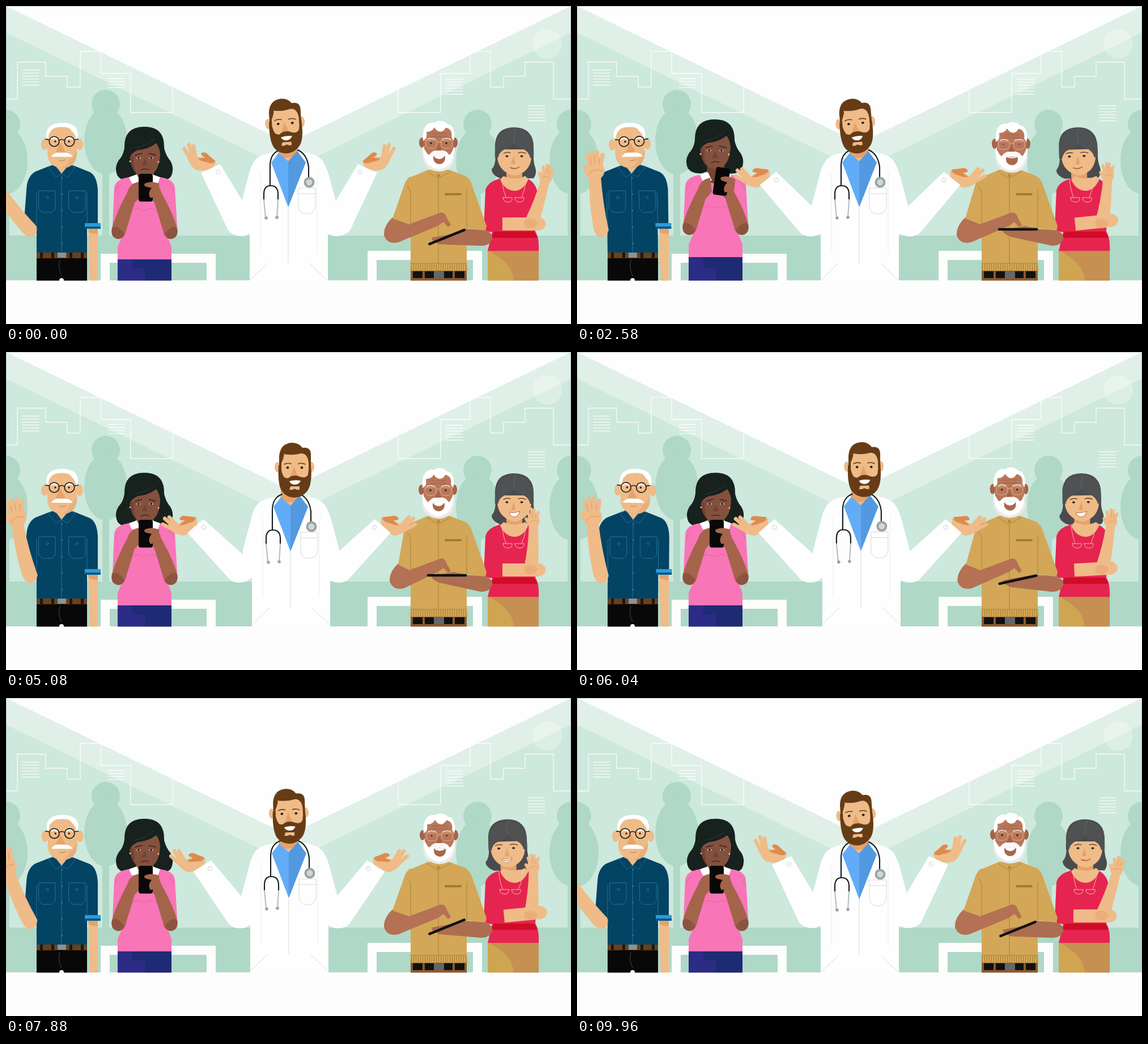
An HTML page for the animation above (10000 ms loop, 997 px wide and 561 px high).

```html
<!DOCTYPE html>
<html lang="en">
<head>
<meta charset="utf-8">
<title>Doctor and patients</title>
<style>
html, body { margin: 0; width: 100%; height: 100%; overflow: hidden; background: #fdfdfd; }
svg { display: block; width: 100vw; height: 100vh; }
.line { fill: none; stroke-linecap: round; stroke-linejoin: round; }
.skin { fill: #efbb88; }
.shade { fill: #e5a269; }
.dark { fill: #a4644a; }
</style>
</head>
<body>
<svg viewBox="0 0 997 561">
  <!-- scenery -->
  <path fill="#cde8dc" d="M0 0H997V484H0Z"/>
  <path fill="#e0f0e9" d="M0 0V47L498 290 997 47V0Z"/>
  <path fill="#fefefe" d="M0 0L498 242 997 0Z"/>
  <g fill="#afd8c7">
    <path d="M0 405H997V484H0Z"/>
    <g id="trees"></g>
  </g>
  <g fill="#fff" opacity=".3"><circle cx="955" cy="67" r="26"/><circle cx="954" cy="65" r="9" opacity=".6"/></g>
  <g class="line" stroke="#fff" stroke-width="1.3" opacity=".85">
    <path d="M0 164H20V99H70V124H108V143H131V80H167V119H220V188H294V143"/>
    <path d="M997 164H966V99H916V124H878V143H855V80H819V119H767V188H692V149"/>
    <path id="windows"/>
  </g>
  <path class="line" stroke="#b9c6c0" d="M.5 484V.5H996.5V484"/>
  <path class="line" style="stroke-linecap:butt;stroke-linejoin:miter" stroke="#fdfdfd" stroke-width="16" d="M175 484V445H362V484M646 484V440H832V484"/>

  <!-- woman in red -->
  <g id="redHead">
    <path fill="#4a4b4d" d="M863 252Q861 214 897 214Q933 215 931 254Q930 272 933 282Q938 294 931 304H872Q857 298 857 288Q866 280 863 252Z"/>
    <path class="shade" d="M883 288H911V312H883Z"/>
    <path class="skin" d="M867 253H927V268Q925 287 910 295Q897 303 885 295Q869 286 867 268Z"/>
    <path fill="#505153" d="M863 268Q860 217 897 216Q934 218 931 268L925 268Q922 255 909 251Q900 249 897 241Q893 250 883 252Q871 255 868 268Z"/>
    <path class="line" stroke="#6a6b6d" stroke-width=".8" d="M897 241Q895 225 900 216"/>
    <path class="shade" d="M896 264L891 279H899Z"/>
    <g id="redFace">
      <path class="line" stroke="#4a3a32" stroke-width="1.3" d="M878 260Q884 257 890 259M904 259Q911 257 917 260"/>
      <g fill="#30251f"><ellipse cx="884" cy="265" rx="2.6" ry="1.8"/><ellipse cx="910" cy="265" rx="2.6" ry="1.8"/></g>
      <path class="line" stroke="#a8533c" stroke-width="1.4" d="M890 285Q898 289 906 284"/>
      <path id="redSmile" fill="#fff" stroke="#a8533c" stroke-width=".8" d="M888 283Q897 285 907 281Q904 291 896 291Q890 290 888 283Z"/>
    </g>
  </g>
  <path fill="#cfa552" d="M850 430H940V490H850Z"/>
  <path fill="#c69052" d="M850 431H940V490H896Q898 455 850 431Z"/>
  <path fill="#e62450" d="M876 303Q850 309 846 325L843 392Q845 398 858 399L850 432H940Q941 408 934 398L938 330Q935 310 917 303Q897 325 876 303Z"/>
  <path class="skin" d="M878 300Q897 309 916 300L922 305Q913 326 897 326Q880 325 872 306Z"/>
  <path id="pendant" class="line" stroke="#f1c9ba" stroke-width=".9" d="M875 305Q877 325 882 337M918 305Q916 325 910 337M877 338H893Q894 346 885 346Q877 345 877 338ZM898 338H914Q915 346 906 346Q898 345 898 338"/>
  <path fill="#d00c27" d="M862 398H932L938 409H854Z"/>
  <path id="redFore" class="skin" d="M876 373H944Q954 379 952 387Q949 396 938 396H876Z"/>
  <g id="redArm">
    <path class="skin" d="M914 382Q923 340 924 306H940Q941 350 939 384Q928 398 914 382Z"/>
    <ellipse class="skin" cx="932" cy="298" rx="11" ry="13"/>
    <path class="line" stroke="#efbb88" stroke-width="5" d="M927 296L923 282M930 292L929 277M934 292V278M938 295L941 283M924 303L919 294"/>
    <path class="line" stroke="#d9945e" stroke-width=".8" d="M926 300Q932 295 939 298M931 291V281M936 292L937 284"/>
  </g>
  <path class="shade" d="M915 378Q930 371 938 382Q935 394 921 392Q912 388 915 378Z" opacity=".5"/>

  <!-- man in mustard -->
  <path fill="#8b5a2d" d="M714 462H813V490H714Z"/>
  <path fill="#111" d="M718 468H735V480H718ZM739 468H755V480H739ZM773 468H788V480H773ZM792 468H809V480H792Z"/>
  <path fill="#62676b" d="M755 468H773V480H755Z"/>
  <path fill="#d3a757" d="M745 289H782L811 300Q820 306 823 318L848 388 846 397 813 392V453L815 467H713L714 453V302Z"/>
  <path class="line" stroke="#a77d35" stroke-width=".9" d="M763 304V453M813 392V325M743 292L762 304 784 292M714 454H813"/>
  <path class="line" stroke="#a77d35" stroke-width="13" stroke-dasharray="1 3" style="stroke-linecap:butt" d="M715 461H813"/>
  <path class="line" stroke="#a17a36" stroke-width="4" d="M776 332H802"/>
  <circle cx="763" cy="299" r="2" fill="none" stroke="#8a652a"/>
  <path id="lowerArm" fill="#ad6d50"/>
  <path id="upperArm" fill="#b47154"/>
  <path id="sleeve" fill="#d3a757"/>
  <path class="line" stroke="#a77d35" stroke-width=".9" d="M714 385V330Q713 322 708 318"/>
  <path id="tablet" class="line" stroke="#111" stroke-width="4.5" d="M-33 0H33"/>
  <g id="tanHead">
    <path fill="#e9ebec" d="M735 240H792V268Q788 291 764 292Q739 290 735 268Z"/>
    <g class="dark"><ellipse cx="734" cy="241" rx="5" ry="9"/><ellipse cx="792" cy="241" rx="5" ry="9"/></g>
    <path fill="#b9775a" d="M738 226Q740 208 764 208Q788 208 790 226V262H738Z"/>
    <path class="line" stroke="#96593f" stroke-width=".8" d="M751 225H777M750 230H778"/>
    <path fill="#fff" d="M736 238Q734 217 742 210Q748 204 756 206Q762 201 769 203Q776 204 779 209Q786 208 789 217Q793 224 790 238L786 232Q788 222 782 217Q777 214 776 215Q770 225 761 220Q757 217 756 214Q752 222 742 222Q743 230 741 234Z"/>
    <path fill="#fff" d="M736 248Q741 258 746 264Q751 254 764 254Q779 254 782 264Q788 258 790 248Q793 282 764 288Q735 284 736 248Z"/>
    <path fill="#a9664b" d="M754 265Q764 262 775 265Q776 278 765 279Q753 278 754 265Z"/>
    <path id="tanMouth" fill="#fff" d="M755 265Q765 262 774 265Q770 270 764 270Q757 269 755 265Z"/>
    <path fill="#a4644a" d="M764 242L758 255H769Z"/>
    <path fill="#f8f8f8" d="M748 262Q754 253 764 257Q775 253 781 262Q770 266 764 263Q757 266 748 262Z"/>
    <path class="line" stroke="#f3eeea" stroke-width="1.7" d="M744 235Q749 232 757 235M770 235Q778 232 784 235"/>
    <g id="tanEyes" fill="#2b1b15"><circle cx="750" cy="242" r="1.7"/><circle cx="777" cy="242" r="1.7"/></g>
    <path class="line" stroke="#dfb599" stroke-width=".9" d="M741 237H760V246Q758 251 752 251H746Q741 250 741 245ZM768 237H787V245Q786 251 780 251H774Q768 250 768 245ZM760 240H768"/>
  </g>

  <!-- woman in pink -->
  <path class="pinkHead" fill="#17211e" d="M209 250Q208 213 244 213Q280 213 279 250Q282 264 290 273Q298 287 291 301Q283 311 266 308L245 300 222 308Q205 310 197 300Q190 286 199 272Q207 264 209 250Z"/>
  <path fill="#2c2b86" d="M197 440H292V490H197Z"/>
  <path fill="#1f2a74" d="M223 440H292V490H245V463H223Z"/>
  <g id="pinkBody">
    <path fill="#f875b8" d="M217 302Q194 305 191 320L188 390 213 388 197 425V447H292V425L278 388 302 390 298 320Q296 305 272 302Z"/>
    <path fill="#74442f" d="M230 285H260L262 312Q245 322 228 312Z"/>
    <path fill="#fff" d="M217 302L231 297 238 312 222 313ZM272 302L258 297 252 312 268 313Z"/>
    <path class="line" stroke="#e05ca0" stroke-width=".8" d="M216 365Q230 352 243 361Q258 352 272 365M193 330Q195 318 203 314M296 330Q294 318 286 314"/>
  </g>
  <g class="pinkHead">
    <path fill="#85513f" d="M218 256Q220 236 245 236Q271 236 272 258Q272 282 262 293Q245 308 228 293Q218 280 218 256Z"/>
    <path fill="#714333" d="M245 270L239 281H250ZM220 264Q218 284 230 295Q224 280 226 265Z"/>
    <path fill="#17211e" d="M212 268Q210 225 245 223Q279 226 276 268L272 260Q270 248 265 242Q252 252 234 254Q222 257 217 270Z"/>
    <path class="line" stroke="#2f3c37" d="M226 251Q250 246 262 234"/>
    <path class="line" stroke="#3a2019" stroke-width="1.3" d="M228 263L240 260M252 260L264 263"/>
    <g fill="#cbb8ae"><ellipse cx="234" cy="268" rx="4" ry="1.5"/><ellipse cx="256" cy="268" rx="4" ry="1.5"/></g>
    <g fill="#1b1210"><circle cx="234" cy="268" r="1.8"/><circle cx="256" cy="268" r="1.8"/></g>
    <path class="line" stroke="#5a2d24" stroke-width="1.8" d="M238 289Q245 286 252 289"/>
    <g fill="#e9c77b"><circle cx="219" cy="274" r="1.5"/><circle cx="269" cy="275" r="1.5"/></g>
  </g>
  <g id="pinkArms" class="dark">
    <path d="M187 392Q194 366 214 329Q218 313 235 310L238 334Q233 342 227 347L212 396Q209 411 198 411Q184 409 187 392Z"/>
    <path d="M302 392Q295 366 274 329Q270 313 256 310L252 334Q257 342 262 347L277 396Q280 411 291 411Q305 409 302 392Z"/>
    <path fill="#8d5340" d="M187 392Q195 384 209 402Q205 411 198 411Q184 409 187 392ZM302 392Q294 384 280 402Q284 411 291 411Q305 409 302 392Z"/>
  </g>
  <g id="phone">
    <rect x="234" y="296" width="25" height="49" rx="4" fill="#080808"/>
    <path class="dark" d="M270 313Q256 308 245 313Q242 317 248 319L257 321Q249 331 255 339L271 333Z"/>
  </g>

  <!-- man in navy -->
  <path class="skin" d="M145 388H162V490H148Z"/>
  <path class="shade" d="M145 391H162V403L146 400Z"/>
  <path fill="#080808" d="M54 440H143V490H54Z"/>
  <path class="line" stroke="#555" stroke-width=".8" d="M95 448Q91 462 98 476"/>
  <circle cx="98" cy="484" r="4" fill="#fdfdfd"/>
  <path fill="#6b4019" d="M54 434H143V445H54Z"/>
  <path fill="#23160d" d="M60 434H65V446H60ZM80 434H85V446H80ZM112 434H117V446H112ZM132 434H137V446H132Z"/>
  <path fill="#8b9297" d="M91 434H106V444H91Z"/>
  <g id="navyBody">
    <path fill="#034364" d="M80 281H118L148 293Q161 300 162 326V384H143V435H54V392H31L36 325Q37 300 52 292Z"/>
    <path fill="#2b9bd6" d="M139 383H167V389H139Z"/><path fill="#08598a" d="M139 389H167V393H139ZM30 386H54V392H30Z"/>
    <path class="skin" d="M86 276H111L112 285 98 297 85 285Z"/>
    <path class="shade" d="M86 276H111V281Q98 291 86 281Z"/>
    <path fill="#034364" stroke="#2e769f" stroke-width=".8" d="M85 279L98 296 88 302 75 285ZM112 279L98 296 109 302 122 285Z"/>
    <path class="line" stroke="#2e769f" stroke-width=".9" d="M98 300V434M58 326H87V358L81 364H64L58 358ZM111 326H140V358L134 364H117L111 358ZM143 384V330M54 384V330"/>
    <g class="line" stroke="#2e769f" stroke-width=".9"><circle cx="73" cy="338" r="2"/><circle cx="125" cy="338" r="2"/></g>
    <path class="line" stroke="#4c93ba" stroke-width="2" stroke-dasharray="0 29" d="M99 303V430"/>
  </g>
  <g id="navyArm">
    <path class="skin" d="M29 390Q23 340 27 300H47Q48 350 56 396Q52 408 42 408Q32 407 29 390Z"/>
    <ellipse class="skin" cx="37" cy="290" rx="17" ry="17"/>
    <path class="line" stroke="#efbb88" stroke-width="7.5" d="M30 285L26 263M35 279L34 258M41 280L43 258M47 284L52 263M24 293L20 283"/>
    <path class="line" stroke="#d9945e" stroke-width=".9" d="M26 297Q34 284 50 291M31 279L30 266M38 277V264M45 279L47 267"/>
  </g>
  <g id="navyHead">
    <ellipse class="skin" cx="68" cy="244" rx="6" ry="10"/><ellipse class="skin" cx="130" cy="244" rx="6" ry="10"/>
    <path class="skin" d="M73 226Q74 214 98 214Q124 214 125 226V262Q123 285 99 286Q75 284 73 262Z"/>
    <path class="shade" d="M112 270Q122 265 125 254V262Q123 285 99 286Q110 280 112 270Z" opacity=".5"/>
    <path fill="#fff" d="M71 232Q69 207 98 206Q128 206 127 229L124 238Q123 226 116 221Q112 212 98 213Q84 213 79 221Q75 224 75 234Z"/>
    <g id="navyFace">
      <path class="shade" d="M95 240L88 258H105Z"/>
      <path class="line" stroke="#fff" stroke-width="2.6" d="M79 235Q84 231 91 235M106 235Q112 231 118 235"/>
      <g fill="#2a1a10"><circle cx="87" cy="239" r="1.7"/><circle cx="111" cy="239" r="1.7"/></g>
      <g fill="none" stroke="#171717" stroke-width="1.6"><circle cx="85" cy="239" r="8.7"/><circle cx="112" cy="239" r="8.7"/><path d="M94 237Q98 234 103 237M76 236L69 235M121 236L128 235"/></g>
      <path fill="#fff" d="M80 266Q84 257 98 259Q113 257 118 266Q98 266 80 266Z"/>
      <path class="line" stroke="#ce8650" stroke-width="1.2" d="M94 272Q99 274 105 271"/>
    </g>
  </g>

  <!-- doctor -->
  <defs>
    <g id="hand">
      <path class="skin" d="M317 263Q321 280 334 290Q350 294 364 287L370 276Q354 266 338 268L327 262Z"/>
      <path class="line" stroke="#efbb88" stroke-width="6.5" d="M324 272L313 254M328 270L321 247M334 272L329 249"/>
      <path fill="#df8a4d" d="M343 261Q349 256 357 264L369 273Q365 280 354 276Q340 274 338 270Q346 269 350 268Q343 265 343 261Z"/>
    </g>
    <path id="foreSleeve" fill="#fefefe" d="M344 294L378 279 436 375Q438 402 419 406Q402 407 392 396Z"/>
  </defs>
  <g id="armL"><use href="#hand" id="handL"/><use href="#foreSleeve"/><circle cx="374" cy="293" r="3.5" fill="none" stroke="#cfcfcf"/></g>
  <g transform="matrix(-1 0 0 1 999 0)"><g id="armR"><use href="#hand" id="handR"/><use href="#foreSleeve"/><circle cx="374" cy="293" r="3.5" fill="none" stroke="#cfcfcf"/></g></g>
  <g id="docBody">
    <path fill="#fefefe" d="M470 259Q446 262 438 274Q431 284 427 303L414 352 412 390Q418 406 430 402V495H568V402Q581 406 586 390L584 352 571 303Q566 284 558 272Q549 262 528 258Z"/>
    <path class="skin" d="M481 240H515V265L498 280 480 265Z"/>
    <path class="shade" d="M481 250H515V261Q498 274 481 263Z"/>
    <path fill="#62acf7" d="M481 259L498 274V355L468 276Z"/>
    <path fill="#5299e0" d="M514 256L498 274V355L529 276Z"/>
    <g class="line" stroke="#d8d8d8">
      <path d="M498 355V453M460 455L431 483M537 455L566 483M516 321H546V352Q545 367 531 367Q516 367 516 352ZM516 331H546"/>
      <path stroke="#ececec" d="M446 293L449 300V435M552 293L549 300V435"/>
    </g>
    <path class="line" stroke="#12191d" stroke-width="2.1" d="M483 254Q466 260 466 282V317M515 254Q531 261 534 284V304M455 341V332Q455 317 467 317Q480 317 480 332V341"/>
    <path class="line" stroke="#b9bdbf" stroke-width="2.1" d="M455 342L458 373M480 342L478 373"/>
    <g fill="#9da2a5"><circle cx="459" cy="374" r="2.8"/><circle cx="478" cy="373" r="2.8"/><circle cx="535" cy="311" r="9.5"/></g>
    <circle cx="535" cy="311" r="5.5" fill="#ccd8d8"/>
  </g>
  <g id="docHead">
    <ellipse class="skin" cx="478" cy="203" rx="5" ry="9"/><ellipse class="skin" cx="538" cy="203" rx="5" ry="9"/>
    <path fill="#663c16" d="M481 206V184Q483 161 504 160Q516 160 522 169Q537 167 537 181V206Z"/>
    <path class="skin" d="M485 196Q491 182 489 180Q505 183 519 179Q531 178 533 195V232H485Z"/>
    <path class="shade" d="M507 202L501 219H514Z"/>
    <path fill="#663c16" d="M480 200L484 199Q485 215 490 221Q497 225 500 220Q509 216 518 220Q528 224 532 216L534 199 537 200Q540 232 531 245Q521 257 508 257Q495 257 486 246Q478 234 480 200Z"/>
    <path fill="#fff" d="M499 228Q509 225 519 227Q516 234 509 234Q502 234 499 228Z"/>
    <path class="skin" d="M501 237H517V243H512Q508 240 505 243H499Z"/>
    <path class="line" stroke="#663c16" stroke-width="1.6" d="M490 198Q496 195 502 197M515 197Q521 195 527 198"/>
    <g id="docEyes" fill="#2b1a10"><ellipse cx="496" cy="204" rx="2.4" ry="2"/><ellipse cx="521" cy="204" rx="2.4" ry="2"/></g>
  </g>
  <path fill="#fdfdfd" d="M0 484.5H997V561H0Z"/>
</svg>
<script>
const LOOP = 10000;
const $ = id => document.getElementById(id);
const move = (id, value) => $(id).setAttribute('transform', value);

$('trees').innerHTML = [[0, 208], [176, 173], [832, 208], [997, 208]].map(([x, y]) =>
  `<circle cx="${x}" cy="${y}" r="25"/><ellipse cx="${x}" cy="${y + 65}" rx="38" ry="59"/>
   <path d="M${x - 6} ${y + 80}H${x + 6}V406H${x - 6}Z"/>`).join('');
$('windows').setAttribute('d', [[29, 113, 6], [180, 128, 4], [777, 129, 6], [922, 176, 6]].map(([x, y, n]) =>
  Array.from({ length: n }, (_, i) => `M${x} ${y + i * 5.3}h29`).join('')).join(''));

// Eased value on a looping track; the last key returns to the first value.
const beats = [0, 1500, 2580, 5080, 6880, 8880, LOOP];
function track(t, values, times = beats) {
  const i = times.findIndex(k => k > t) - 1;
  const u = (t - times[i]) / (times[i + 1] - times[i]);
  const s = Math.min(1, Math.max(0, (u - .5) * 1.3 + .5));
  const a = values[i], b = values[(i + 1) % values.length];
  return a + (b - a) * s * s * (3 - 2 * s);
}
const squash = (id, y, s) => move(id, `matrix(1 0 0 ${s} 0 ${y * (1 - s)})`);

function draw(t) {
  const k = (...values) => track(t, values);

  // Doctor
  const fore = k(0, -2, -15, -17, -17, -1), wrist = k(3, 10, -15, -14, -15, 0);
  for (const side of 'LR') {
    move('arm' + side, `rotate(${fore} 416 386)`);
    move('hand' + side, `rotate(${wrist} 362 285)`);
  }
  move('docBody', `translate(${k(0, 0, 0, 4, 2, 0)} ${k(0, 0, 0, -3, -4, 0)})`);
  move('docHead', `translate(${k(-12, -10.5, -12, 1, -3, -11.5)} ${k(3, 3, 3, 0, -2, 2)}) rotate(${k(-4, -1, -5, 0, -1, -3)} 508 257)`);
  squash('docEyes', 204, k(1, .35, 1, 1, 1, 1));

  // Man in navy
  const lean = k(0, 2, -2, 0, 2, -2), skew = -lean / 154;
  move('navyBody', `matrix(1 0 ${skew} 1 ${-skew * 434} 0)`);
  const turn = k(0, 6, -5, 0, 6, -5);
  move('navyHead', `translate(${turn} 0) rotate(${turn * .3} 98 280)`);
  move('navyFace', `translate(${-turn * .8} 0)`);
  const wave = track(t, [-34, 0, -3, -11, -2, -10, -2, -37],
    [0, 1500, 2580, 3000, 3600, 5080, 6880, 8880, LOOP]);
  move('navyArm', `rotate(${wave} 42 396)`);

  // Woman in pink
  const lift = k(0, 0, 1, 0, 0, 0);
  for (const part of document.querySelectorAll('.pinkHead'))
    part.setAttribute('transform', `translate(${-lift} ${-13 * lift})`);
  move('pinkBody', `translate(0 ${-4 * lift})`);
  move('pinkArms', `translate(0 ${-7 * lift})`);
  move('phone', `translate(${8.5 * lift} ${-11 * lift}) rotate(${8 * lift} 246 320)`);

  // Man in mustard
  const e = k(0, -8, 3, 10, 0, 0), y = k(407.5, 394, 394, 394, 407.5, 400);
  $('sleeve').setAttribute('d', `M722 296Q706 302 702 318L${682 + e} 375L714 386V300Z`);
  $('upperArm').setAttribute('d', `M${682 + e} 373Q${666 + e} 388 ${667 + e} 404Q${672 + e} 421 ${692 + e} 417
    L762 388 772 381 780 390 785 386 778 374Q775 364 768 364L714 384Z`);
  $('lowerArm').setAttribute('d', `M812 393L846 396Q860 400 858 412Q852 424 838 423L765 ${y + 13}Q748 ${y + 6} 752 ${y + 1}L790 ${y - 6}Z`);
  move('tablet', `translate(778 ${y}) rotate(${k(-22, 0, 0, 0, -22, -22)})`);
  move('tanHead', `translate(${k(0, 0, 3, -1, 0, 2)} ${k(0, 2, 2, 2, 0, 2)})`);
  squash('tanEyes', 242, k(1, .35, .3, 1, 1, .3));
  squash('tanMouth', 265, k(1, .3, .3, 1, 1, .4));

  // Woman in red
  const look = k(0, 1, 1, 0, .9, 1);
  move('redHead', `translate(${-11 * look} 0) rotate(${-2 * look} 897 295)`);
  move('redFace', `translate(${-3 * look} 0)`);
  move('pendant', `translate(${-6 * look} 0)`);
  move('redFore', `translate(${3 * look} 0) rotate(${-6 * look} 880 385)`);
  $('redSmile').setAttribute('opacity', k(0, 0, 0, 1, 1, 0));
  const hi = track(t, [14, 0, 3, 13, 0, -1, 13, 0, -2, -1, 7, 14],
    [0, 1500, 2580, 2900, 3600, 5080, 5700, 6400, 6880, 8200, 8880, 9300, LOOP]);
  move('redArm', `rotate(${hi} 927 385)`);
}

function frame(now) {
  draw(now % LOOP);
  requestAnimationFrame(frame);
}
requestAnimationFrame(frame);
</script>
</body>
</html>
```
